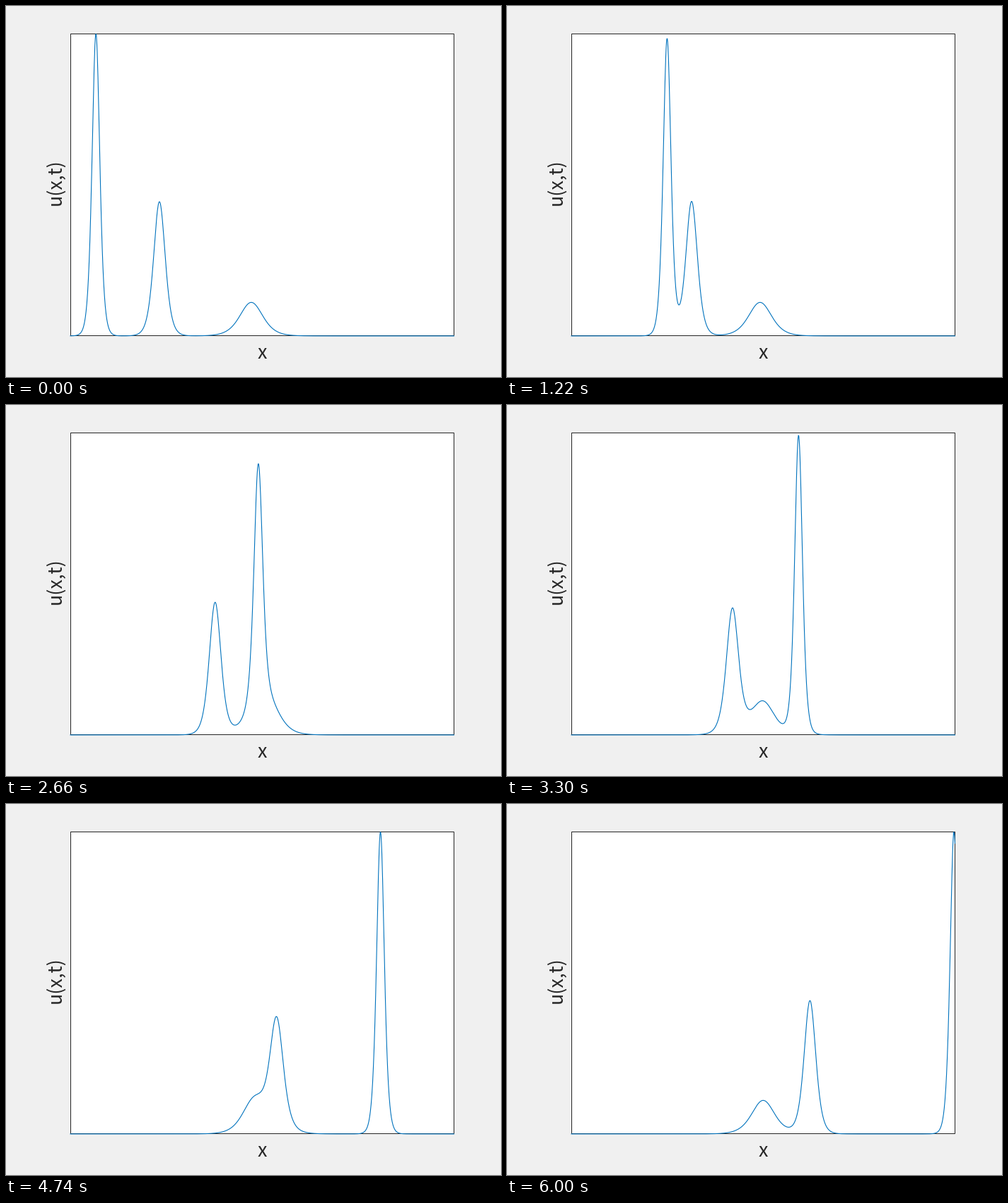
Write a matplotlib script that moves like this. It is 700x525 px and loops after 6.02 s.

```python
from itertools import combinations

import matplotlib.pyplot as plt
import numpy as np
from matplotlib.animation import FuncAnimation
from matplotlib.patches import Rectangle

W, H, DPI = 700, 525, 100
FRAMES, STEP = 301, 20
HOLDS = {31, 62, 248}  # slots that repeat the previous picture

K = (1, 2, 3)           # soliton wave numbers
PHASE = (20, 20, 10)
LENGTH, PEAK, T_END = 50, 4.5, 5
INK, BLUE = "#262626", "#0072BD"

# Each term of the tau function: (wave number, cube sum, constant)
TERMS = []
for n in range(4):
    for group in combinations(range(3), n):
        shift = sum(2 * np.log((K[j] - K[i]) / (K[j] + K[i]))
                    for i, j in combinations(group, 2))
        TERMS.append((sum(K[i] for i in group),
                      sum(K[i] ** 3 for i in group),
                      shift - sum(PHASE[i] for i in group)))
k_sum, k_cube, const = np.array(TERMS, float).T[:, :, None]

x = np.linspace(0, LENGTH, 1001)


def solitons(t):
    """KdV solution u = 2 (ln tau)'', as a weighted variance of k."""
    power = k_sum * x - k_cube * t + const
    p = np.exp(power - power.max(axis=0))
    p /= p.sum(axis=0)
    mean = (p * k_sum).sum(axis=0)
    return 2 * (p * (k_sum - mean) ** 2).sum(axis=0)


def px(size):
    return size * 72 / DPI


fig = plt.figure(figsize=(W / DPI, H / DPI), dpi=DPI, facecolor="#F0F0F0")

# Box on whole pixels, below the axes that carry the curve
page = fig.add_axes([0, 0, 1, 1])
page.set(xlim=(0, W), ylim=(H, 0))
page.axis("off")
page.add_patch(Rectangle((91.5, 39.5), 542, 427, facecolor="white",
                         edgecolor=INK, lw=px(1), snap=False))

left, right, top, bottom = 91, 633.5, 39.4, 466.9
ax = fig.add_axes([left / W, 1 - bottom / H,
                   (right - left) / W, (bottom - top) / H])
ax.set(xlim=(0, LENGTH), ylim=(0, PEAK))
ax.axis("off")
curve, = ax.plot(x, solitons(0), color=BLUE, lw=px(1.1), clip_on=False,
                 snap=False)

label = dict(family="Noto Sans CJK JP", size=px(27), color=INK,
             ha="center", va="baseline")
page.text(362.5, 499, "x", **label)
page.text(77, 249.5, "u(x,t)", rotation=90, rotation_mode="anchor", **label)


def draw(i):
    slot = i - 1 if i in HOLDS else i
    curve.set_ydata(solitons(T_END * slot / (FRAMES - 1)))
    return curve,


anim = FuncAnimation(fig, draw, frames=FRAMES, interval=STEP,
                     repeat=True, repeat_delay=0)
plt.show()
```
